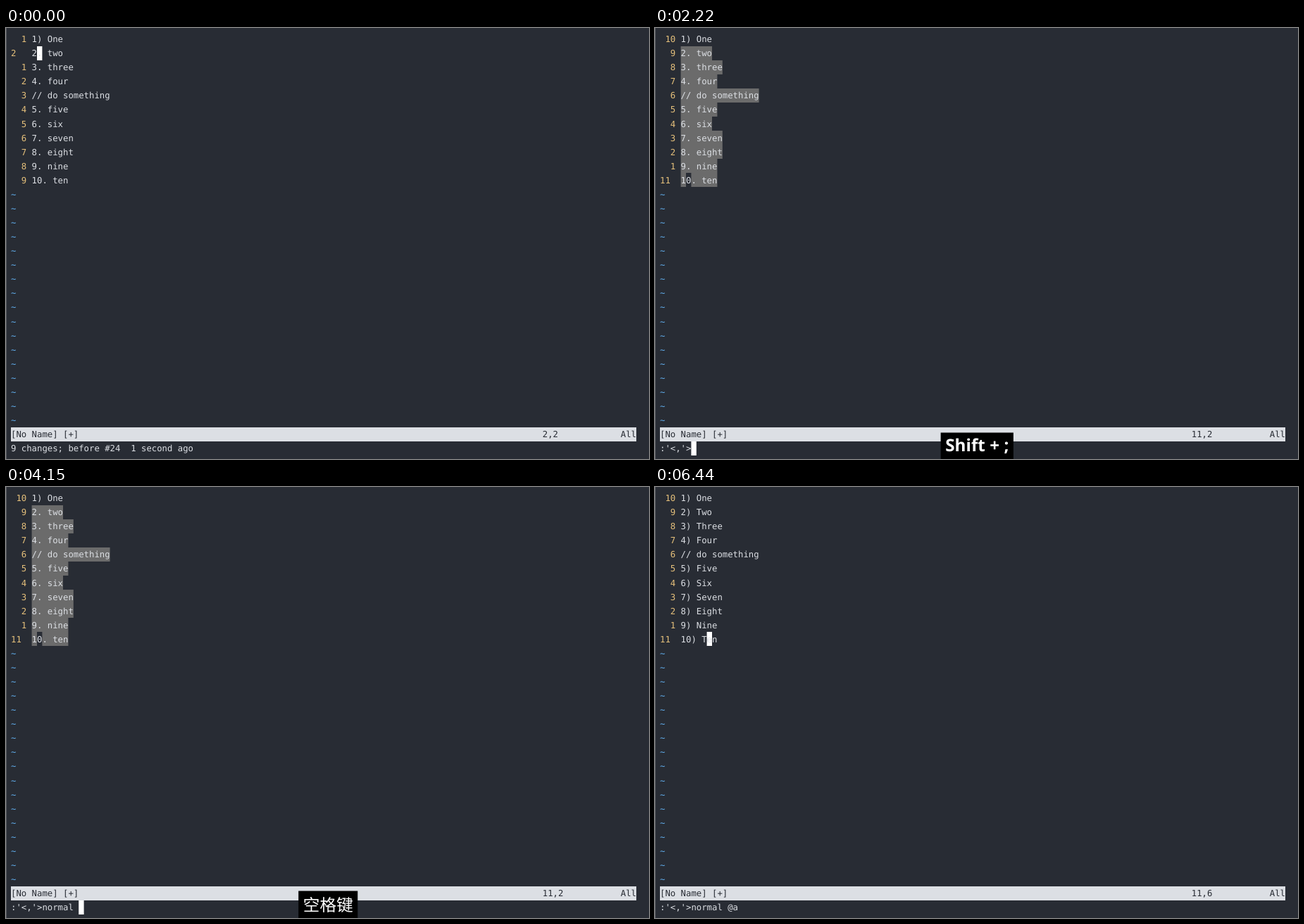
Recreate the animation shown at these times as an HTML page with a canvas. Size 913 px wide and 613 px high, loop 6770 ms.

```html
<!DOCTYPE html>
<html lang="en">
<head>
<meta charset="utf-8">
<title>Editor macro demo</title>
<style>
  html, body { margin: 0; width: 100%; height: 100%; overflow: hidden; background: #282c34; }
  canvas { display: block; }
</style>
</head>
<body>
<canvas id="stage" width="913" height="613"></canvas>
<script>
const ctx = document.getElementById('stage').getContext('2d');
const W = 913, H = 613, LOOP = 6770;
const LEFT = 7, TOP = 5.6, CELL = 7.4, ROW = 20.07, COLS = 120, GUTTER = 4;
const STATUS_ROW = 28, CMD_ROW = 29;
const MONO = '12.3px "DejaVu Sans Mono", monospace';
const KEY_FONT = '700 24.3px "Open Sans", "Noto Sans", sans-serif';
const CJK_FONT = '500 23.7px "Noto Sans CJK SC", "Noto Sans CJK", sans-serif';
const C = { bg: '#282c34', fg: '#dcdfe4', num: '#e5c07b', tilde: '#61afef', sel: '#6b6b6b', cursor: '#ffffff' };

const WORDS = ['two', 'three', 'four', null, 'five', 'six', 'seven', 'eight', 'nine', 'ten'];
const capital = w => w[0].toUpperCase() + w.slice(1);

function makeLines(done) {
  let n = 1;
  const rest = WORDS.map(w => {
    if (!w) return '// do something';
    n++;
    return done ? `${n}) ${capital(w)}` : `${n}. ${w}`;
  });
  return ['1) One', ...rest];
}
const BEFORE = makeLines(false), AFTER = makeLines(true);

const ex = (typed, cursor = true) => ({ cmd: ":'<,'>" + typed, cmdCursor: cursor });
const SPACE = '空格键';

// Each entry changes part of the state from its time on.
const TIMELINE = [
  [0, { lines: BEFORE, row: 1, col: 1, selEnd: 0, cmd: '9 changes; before #24  1 second ago',
        cmdCursor: false, textCursor: true, count: '', keys: [] }],
  [190, { keys: ['Shift'] }],
  [390, { keys: ['Shift + V'] }],
  [460, { cmd: '-- VISUAL LINE --', selEnd: 1, count: '1' }],
  [890, { keys: ['Shift + V', 'Shift + G'], row: 10, selEnd: 10, count: '10' }],
  [1280, { keys: ['Shift + G'] }],
  [1810, { keys: [] }],
  [1940, { keys: ['Shift'] }],
  [2140, { keys: ['Shift + ;'] }],
  [2220, { ...ex(''), textCursor: false, count: '' }],
  [2550, ex('n')],
  [2690, { keys: ['Shift + ;', 'o'] }],
  [2760, ex('no')],
  [2900, ex('nor')],
  [3030, { keys: ['o'] }],
  [3090, { keys: ['o', 'm'] }],
  [3180, ex('norm')],
  [3250, { keys: ['o', 'm', 'a'] }],
  [3320, ex('norma')],
  [3460, ex('normal')],
  [3550, { keys: ['o', 'm', 'a', SPACE] }],
  [3620, { ...ex('normal '), keys: ['m', 'a', SPACE] }],
  [4010, { keys: ['a', SPACE] }],
  [4150, { keys: [SPACE] }],
  [4220, { keys: [SPACE, 'Shift'] }],
  [4440, { ...ex('normal @'), keys: ['Shift + 2'] }],
  [4660, { ...ex('normal @a'), keys: ['Shift + 2', 'a'] }],
  [5400, { keys: ['a'] }],
  [5490, { ...ex('normal @a', false), lines: AFTER, col: 5, selEnd: 0, textCursor: true,
           keys: ['a', 'Enter'] }],
  [5590, { keys: ['Enter'] }],
  [6440, { keys: [] }]
];

const cellX = col => LEFT + col * CELL;
const rowY = row => TOP + row * ROW;

function fillCells(row, col, count, color) {
  const y = Math.round(rowY(row));
  ctx.fillStyle = color;
  ctx.fillRect(cellX(col), y, count * CELL, Math.round(rowY(row + 1)) - y);
}

function print(row, col, text, color = C.fg) {
  ctx.fillStyle = color;
  [...text].forEach((ch, i) => ctx.fillText(ch, cellX(col + i), rowY(row) + 14.5));
}

function drawBuffer(s) {
  s.lines.forEach((line, i) => {
    const current = i === s.row;
    const label = current ? String(i + 1) : String(Math.abs(i - s.row)).padStart(3);
    print(i, 0, label, C.num);
    if (i > 0 && i <= s.selEnd) fillCells(i, GUTTER, line.length, C.sel);
    if (current) fillCells(i, GUTTER + s.col, 1, s.textCursor ? C.cursor : C.bg);
    print(i, GUTTER, line);
  });
  for (let r = s.lines.length; r < STATUS_ROW; r++) print(r, 0, '~', C.tilde);
}

function drawStatus(s) {
  fillCells(STATUS_ROW, 0, COLS, C.fg);
  print(STATUS_ROW, 0, '[No Name] [+]', C.bg);
  print(STATUS_ROW, 102, `${s.row + 1},${s.col + 1}`, C.bg);
  print(STATUS_ROW, 117, 'All', C.bg);
  print(CMD_ROW, 0, s.cmd);
  print(CMD_ROW, 109, s.count);
  if (s.cmdCursor) fillCells(CMD_ROW, s.cmd.length, 1, C.cursor);
}

// The box hugs the tallest and lowest glyphs of the label.
function labelMetrics(text) {
  if (text.includes(SPACE)) return { top: 574.5, base: 603 };
  if (text.includes(';')) return { top: 575.5, base: 602 };
  if (/[A-Z]/.test(text)) return { top: 578, base: 604.3 };
  return { top: 581, base: 603.8 };
}

function drawKeys(keys) {
  if (!keys.length) return;
  const gap = 12.6, pad = 6.5;
  const fontOf = key => key === SPACE ? CJK_FONT : KEY_FONT;
  const widths = keys.map(key => {
    ctx.font = fontOf(key);
    return ctx.measureText(key).width;
  });
  const total = widths.reduce((a, b) => a + b, gap * (keys.length - 1));
  const { top, base } = labelMetrics(keys.join(''));
  let x = 457.3 - total / 2;
  ctx.fillStyle = '#000';
  ctx.fillRect(x - pad, top, total + 2 * pad, H - top);
  ctx.fillStyle = '#fff';
  keys.forEach((key, i) => {
    ctx.font = fontOf(key);
    ctx.fillText(key, x, base);
    x += widths[i] + gap;
  });
}

function stateAt(t) {
  return Object.assign({}, ...TIMELINE.filter(([at]) => at <= t).map(([, change]) => change));
}

function draw(t) {
  const s = stateAt(t);
  ctx.textRendering = 'geometricPrecision';
  ctx.textBaseline = 'alphabetic';
  ctx.fillStyle = C.bg;
  ctx.fillRect(0, 0, W, H);
  ctx.fillStyle = '#55585e';
  ctx.fillRect(0, 0, 1, H);
  ctx.font = MONO;
  drawBuffer(s);
  drawStatus(s);
  drawKeys(s.keys);
}

const start = performance.now();
function tick() {
  draw((performance.now() - start) % LOOP);
  requestAnimationFrame(tick);
}
tick();
</script>
</body>
</html>
```
